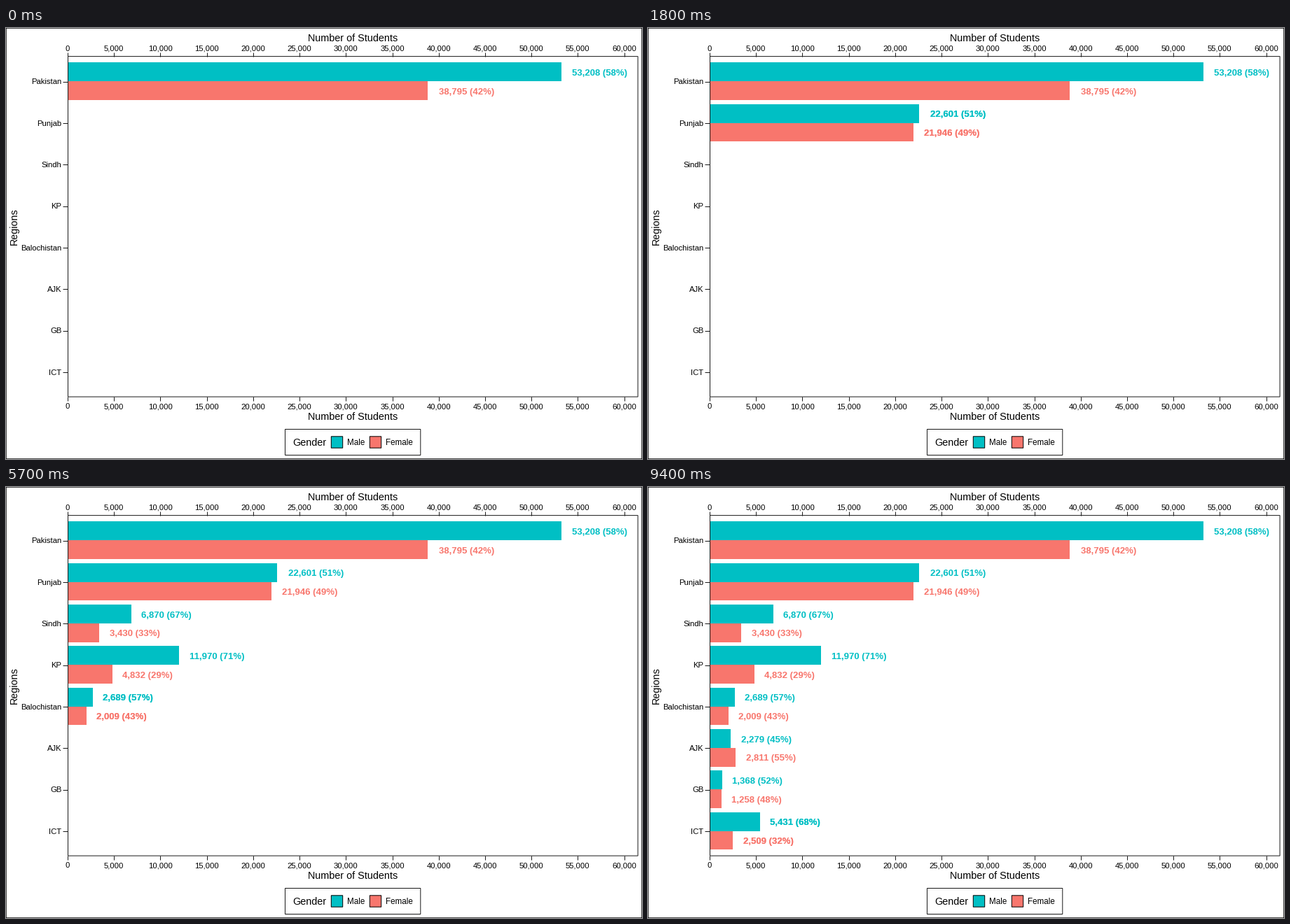
A matplotlib script for the animation above (10 s loop, 908 by 616 pixels).

```python
import matplotlib.pyplot as plt
from matplotlib.animation import FuncAnimation
from matplotlib.patches import Rectangle

W, H, DPI = 908, 616, 100
PT = 72 / DPI  # points per pixel
TEAL, CORAL, LINE = "#00BFC4", "#F8766D", "#1A1A1A"
LEFT, RIGHT, TOP, BOTTOM = 88.0, 902.1, 40.6, 527.1
PER_STUDENT = 13.243 / 1000
ROW = (BOTTOM - TOP) / 8.2
BAR = 0.45 * ROW
TITLE, TICK, KEY, VALUE = 14.4, 11.3, 11.6, 13.15

# region, male, female, male share, start time, time its labels thicken
REGIONS = [
    ("Pakistan", 53208, 38795, 58, 0, 500),
    ("Punjab", 22601, 21946, 51, 1200, 1800),
    ("Sindh", 6870, 3430, 67, 2500, 3100),
    ("KP", 11970, 4832, 71, 3800, 4400),
    ("Balochistan", 2689, 2009, 57, 5100, 5700),
    ("AJK", 2279, 2811, 45, 6400, 7000),
    ("GB", 1368, 1258, 52, 7600, 8200),
    ("ICT", 5431, 2509, 68, 8800, 9400),
]
STEP, LOOP = 100, 10000

plt.rcParams["font.family"] = "Liberation Sans"
fig = plt.figure(figsize=(W / DPI, H / DPI), dpi=DPI, facecolor="white")
ax = fig.add_axes([0, 0, 1, 1])
ax.set(xlim=(0, W), ylim=(H, 0))
ax.axis("off")


def text(x, y, label, size, ha="left", color="black", **kw):
    return ax.text(x, y, label, fontsize=size * PT, ha=ha, va="baseline",
                   color=color, **kw)


def outline(x, y, w, h, fill="none", edge=LINE, lw=1.0):
    ax.add_patch(Rectangle((x, y), w, h, facecolor=fill, edgecolor=edge,
                           linewidth=lw * PT, snap=False, clip_on=False,
                           zorder=3))


def line(xs, ys):
    ax.plot(xs, ys, color=LINE, lw=PT, solid_capstyle="butt", zorder=3)


def draw_axes():
    outline(0, 0, W, H, edge="black", lw=1.4)
    outline(LEFT + 0.5, TOP, RIGHT - LEFT - 0.5, BOTTOM - TOP)
    for value in range(0, 60001, 5000):
        x = LEFT + value * PER_STUDENT
        line([x, x], [TOP - 6, TOP])
        line([x, x], [BOTTOM, BOTTOM + 6])
        for y in (32.7, 544):
            text(x, y, f"{value:,}", TICK, "center")
    for y in (19, 560):
        text((LEFT + RIGHT) / 2, y, "Number of Students", TITLE, "center")
    text(15.8, (TOP + BOTTOM) / 2, "Regions", TITLE, "center",
         rotation=90, rotation_mode="anchor")


def draw_legend():
    outline(398.5, 573.5, 193.3, 37)
    text(409.4, 597, "Gender", TITLE)
    for x, name, color in ((464.3, "Male", TEAL), (519.3, "Female", CORAL)):
        outline(x, 583.8, 16.4, 16.4, color, "black")
        text(x + 22.6, 596.3, name, KEY)


def draw_value(count, share, y, color):
    """Draw a bar from y down; return its artists and the overprinted label."""
    width = count * PER_STUDENT
    bar = ax.add_patch(Rectangle((LEFT, y), width, BAR, color=color, lw=0))
    digits = len(str(count))
    x = LEFT + width + 0.2 * VALUE * (3.223 + 0.556 * digits)
    label, overprint = (
        text(x, y + BAR / 2 + 5.2, f"{count:,} ({share}%)", VALUE,
             color=color, weight="bold")
        for _ in range(2))
    return [bar, label], overprint


draw_axes()
draw_legend()
groups = []
for i, (name, male, female, share, start, thicken) in enumerate(REGIONS):
    y = TOP + (0.6 + i) * ROW
    line([LEFT - 7, LEFT], [y + 0.5, y + 0.5])
    text(79.3, y + 4.1, name, TICK, "right")
    upper, over_m = draw_value(male, share, y - BAR, TEAL)
    lower, over_f = draw_value(female, 100 - share, y, CORAL)
    groups.append((start, thicken, upper + lower, [over_m, over_f]))


def update(frame):
    t = frame * STEP
    ends = [g[0] for g in groups[1:]] + [LOOP]
    for (start, thicken, artists, overprints), end in zip(groups, ends):
        for artist in artists:
            artist.set_visible(t >= start)
        for artist in overprints:
            artist.set_visible(thicken <= t < end)
    return []


anim = FuncAnimation(fig, update, frames=LOOP // STEP, interval=STEP,
                     repeat=True, repeat_delay=0, blit=False)
plt.show()
```
